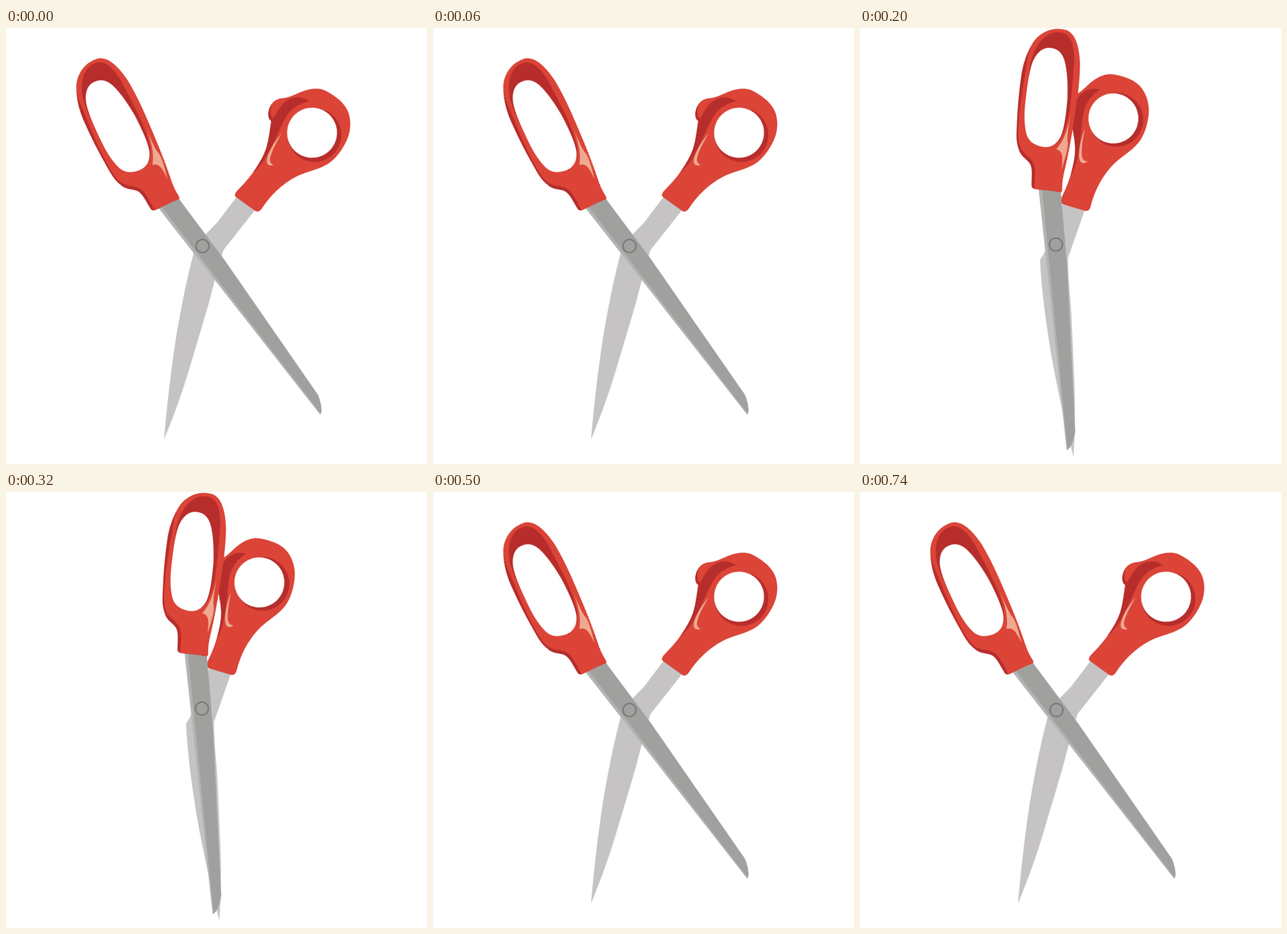
These frames come from a looping animation (736 px wide and 761 px high, 0.9 s). An HTML page:

```html
<!DOCTYPE html>
<html lang="en">
<head>
<meta charset="utf-8">
<title>Scissors</title>
<style>
  html, body { margin: 0; width: 100%; height: 100%; overflow: hidden; background: #fff; }
  svg { display: block; width: 736px; height: 761px; }
  .red { fill: #db4437; }
  .dark { fill: #b62d2b; }
  .shine { fill: #efa990; }
  .hole { fill: #fff; }
  #back { transform-origin: 475px 167px; }
  #front { transform-origin: 343.5px 379px; }
</style>
</head>
<body>
<svg viewBox="0 0 736 761">
  <g id="back">
    <path fill="#c6c3c4" d="M380 296L353 360L334 393L327 402C325 460 329 520 333 570C339 632 348 696 357 750C365 694 368 655 370 600C372 550 374 510 374 480C374 450 374 425 376 403L412 322Z"/>
    <path class="red" d="M373 308C370 306 371 301 374 296C388 273 402 241 404 214C405 195 402 180 401 165C392 161 390 148 394 136C398 126 405 123 413 120C426 115 436 102 452 94.5C461 90 471 88 480 90C494 93 512 100 522 110C534 122 539 140 538 156C537 174 528 200 515 213C500 228 480 236 466 249C446 267 431 292 423 316C421 322 417 326 411 323C398 318 385 313 373 308Z"/>
    <path class="dark" d="M456 115C444 109 427 113 417 125C407 137 406 155 401 165C402 180 405 195 404 214C403 228 398 244 392 260C402 248 409 225 413 205C418 185 420 160 426 146C432 132 442 122 456 115Z"/>
    <path class="dark" d="M394 136C390 148 392 161 401 165L404 160C397 158 394 150 394 136Z"/>
    <circle class="dark" cx="480" cy="169.5" r="47"/>
    <circle class="hole" cx="475" cy="166.8" r="43.7"/>
    <path class="shine" d="M424 180C414 200 409 220 410 232C411 241 417 242 424 238C416 237 414 230 415 222C416 208 420 195 424 180Z"/>
  </g>
  <g id="front">
    <path fill="#b3b4b2" d="M280.5 294L482 711L486 703L320 288Z"/>
    <path fill="#a0a19e" d="M287 294L481 705L483 710L486 703C487 695 488 679 483 670L376 411L320 288Z"/>
    <circle cx="343.5" cy="379" r="11.4" fill="none" stroke="#757573" stroke-width="2.2"/>
    <path class="dark" d="M235 20.5C252 21 266 40 277 68C284 88 291 115 297 147C305 188 311 222 314 252C316 270 319 278 321 284C323 289 321 291 317 291C303 293 290 297 281 299C275 301 271 301 269 297C265 287 262 271 255 263C249 256 235 256 227 245C218 234 215 225 211 212C201 181 193 150 187 120C183 100 183 76 188 58C194 39 210 22 235 20.5Z"/>
    <path class="red" d="M235 20.5C252 21 266 40 277 68C284 88 291 115 297 147C305 188 311 222 314 252C316 270 319 278 321 284C323 289 321 291 317 291C303 293 290 297 281 299L275 300C270 284 267 268 260 260C252 250 236 250 227 239C219 230 214 213 210 199C201 167 195 130 190 102C185 82 186 66 188 58C194 39 210 22 235 20.5Z"/>
    <path class="dark" d="M204 140C200 118 192 92 195 72C198 46 211 28 231 27C248 27 257 43 265 64C273 92 284 130 289 162C292 185 291 205 284 214Z"/>
    <path class="hole" d="M225 58C235 57 244 63 250 72C261 88 270 111 277 133C284 160 289 182 288 198C286 216 276 225 262 226.5C248 228 237 225 229 213C219 197 213 178 209 160C204 138 199 118 198 97C198 77 205 59 225 58Z"/>
    <path class="shine" d="M291 154C295 178 298 196 304 206C308 218 308 238 309 252C304 234 302 221 288 222C296 205 295 180 291 154Z"/>
  </g>
</svg>
<script>
  const LOOP = 900;
  // Start time of each held pose
  const steps = [[0, 'open'], [100, 'half'], [200, 'shut'], [400, 'half'], [500, 'open'], [LOOP, 'open']];
  // x shift, y shift, angle
  const poses = {
    back: { open: [60, 16, 14.35], half: [0, 0, 0], shut: [-32, -9, -4.7] },
    front: { open: [0, 1.5, -12.31], half: [0, 0, 0], shut: [-1, -1, 19.65] }
  };

  for (const [id, pose] of Object.entries(poses)) {
    const frames = steps.map(([time, name]) => {
      const [x, y, angle] = pose[name];
      return {
        offset: time / LOOP,
        transform: `translate(${x}px, ${y}px) rotate(${angle}deg)`,
        easing: 'steps(1, end)'
      };
    });
    document.getElementById(id).animate(frames, { duration: LOOP, iterations: Infinity });
  }
</script>
</body>
</html>
```
